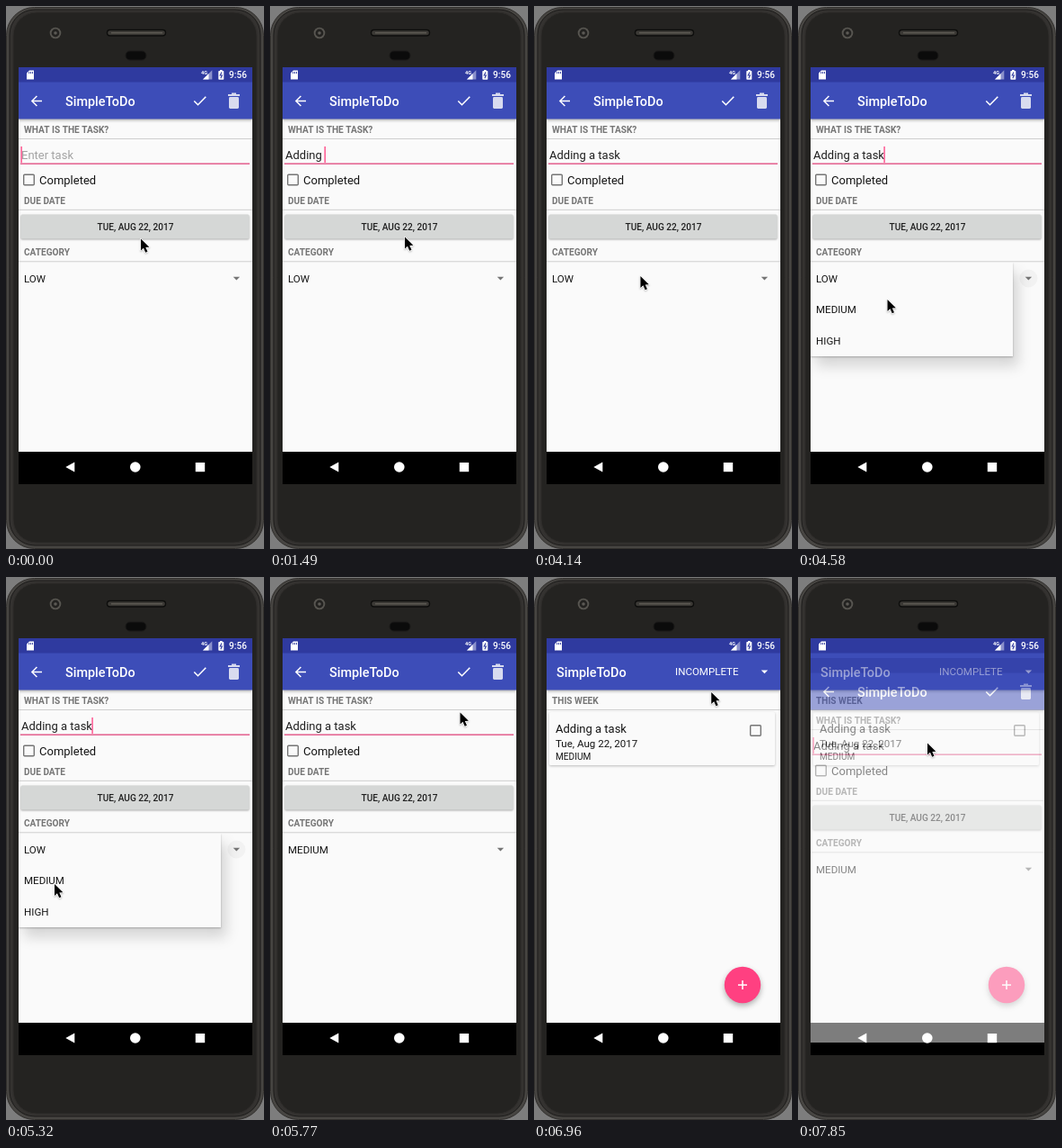
Recreate the animation shown at these times as an HTML page with a canvas. Size 287 by 603 pixels, loop 8 s.

```html
<!DOCTYPE html>
<html lang="en">
<head>
<meta charset="utf-8">
<title>To-do app</title>
<style>
html, body { margin: 0; width: 287px; height: 603px; overflow: hidden; background: #7d7d7d; }
canvas { display: block; }
</style>
</head>
<body>
<canvas id="stage" width="287" height="603"></canvas>
<script>
const W = 287, H = 603, LOOP = 8000, TICK = 148;
const BAR = '#3d4db8', STATUS = '#2f3a9f', PAPER = '#fafafa', INK = '#151515';
const PINK = '#ff4081', GREY = '#757575', RISE = 37;
const TASK = 'Adding a task', DATE = 'Tue, Aug 22, 2017';
const LIST_AT = 6410, EDIT_AT = 7744, MENU_AT = 28, PICK_AT = 36;
const stage = document.getElementById('stage').getContext('2d');
let g = stage;

// Typing bursts, one letter per tick: [first tick, letters]
const bursts = [[4, 'Addi'], [8, 'ng a '], [15, 'tas'], [22, 'k']];

// Pointer moves: [first tick, last tick, x, y]
const moves = [[0, 1, 150, 256.5], [23, 31, 99.5, 326], [31, 34, 54, 341],
  [36, 39, 211.5, 150.5], [39, 41, 215, 109], [46, 50, 144, 184.5]];

const clamp = v => Math.max(0, Math.min(1, v));

function rect(x, y, w, h, color) {
  g.fillStyle = color;
  g.fillRect(x, y, w, h);
}

function round(x, y, w, h, r, fill, line, lw = 1) {
  g.beginPath();
  g.roundRect(x, y, w, h, r);
  if (fill) { g.fillStyle = fill; g.fill(); }
  if (line) { g.strokeStyle = line; g.lineWidth = lw; g.stroke(); }
}

function disc(x, y, r, color) {
  g.beginPath();
  g.arc(x, y, r, 0, 7);
  g.fillStyle = color;
  g.fill();
}

function trace(pts) {
  g.beginPath();
  pts.forEach(p => g.lineTo(...p));
}

function poly(pts, color) {
  trace(pts);
  g.fillStyle = color;
  g.fill();
}

function line(pts, color, lw) {
  trace(pts);
  g.strokeStyle = color;
  g.lineWidth = lw;
  g.stroke();
}

function text(s, x, y, size, color, weight = 400, align = 'left') {
  g.font = `${weight} ${size}px Roboto, sans-serif`;
  g.textAlign = align;
  g.fillStyle = color;
  g.fillText(s, x, y);
}

function shadow(alpha, blur, dx, dy, draw) {
  g.save();
  g.shadowColor = `rgba(0,0,0,${alpha})`;
  g.shadowBlur = blur;
  g.shadowOffsetX = dx;
  g.shadowOffsetY = dy;
  draw();
  g.restore();
}

function clipped(y, h, draw) {
  g.save();
  g.beginPath();
  g.rect(14, y, 260, h);
  g.clip();
  draw();
  g.restore();
}

function phone() {
  rect(0, 0, W, H, '#7d7d7d');
  round(0.5, 1.5, 286, 601, 31, '#474542', '#32302e');
  round(4, 4, 279, 595, 28, '#343230', '#1c1b1a');
  round(8, 7, 271, 589, 26, '#242321', '#2f2d2b');
  disc(55, 30, 6.3, '#575550');
  disc(55, 30, 4.4, '#232220');
  disc(55, 30, 1.8, '#5c5a55');
  round(112.5, 26.5, 65, 6.5, 3.2, '#3b3935', '#0d0d0c', 1.4);
  line([[117, 29.8], [174, 29.8]], '#5b5852', 1.6);
  round(133, 50, 23, 10, 5, '#0b0b0b', '#1a1918');
  rect(14, 68, 260, 463, '#000');
}

function chrome() {
  rect(14, 68, 260, 427, PAPER);
  shadow(0.3, 3, 0, 1, () => rect(14, 84, 260, 41.5, BAR));
  rect(14, 68, 260, 16.5, STATUS);
}

function header(s, y) {
  text(s, 20, y, 10.1, GREY, 700);
  rect(14, y + 6, 260, 1, '#cfcfcf');
}

const arrow = (y, color) => poly([[252.7, y - 1.8], [260.1, y - 1.8], [256.4, y + 1.9]], color);
const checkbox = (x, y) => round(x - 5.8, y - 5.8, 11.6, 11.6, 1, null, GREY, 1.4);

function trash(color) {
  rect(247, 98, 13, 2, color);
  rect(251, 96.5, 5, 2, color);
  round(248, 101, 11, 13, 1.4, color);
}

function editScreen({ task, caret, choice, menu = 0, tap = false }) {
  chrome();
  if (tap) disc(216, 105.5, 13, 'rgba(20,25,80,.14)');
  line([[40, 105.5], [29, 105.5]], '#fff', 1.5);
  line([[34.4, 100], [28.9, 105.5], [34.4, 111]], '#fff', 1.5);
  text('SimpleToDo', 66, 110.5, 14.45, '#fff', 500);
  line([[209.3, 105.5], [213.5, 109.7], [222.3, 100.8]], '#fff', 1.6);
  trash('#d8dbef');

  header('WHAT IS THE TASK?', 141);
  text(task || 'Enter task', 17, 169.7, 13, task ? '#202020' : '#a3a3a3');
  rect(16, 174.5, 255, 1.3, '#e0477d');
  if (caret >= 0) {
    const x = 17 + g.measureText(task.slice(0, caret)).width;
    rect(x - 0.5, 156, 1.3, 18, PINK);
  }
  checkbox(25.5, 193);
  text('Completed', 37, 197.7, 13, INK);
  header('DUE DATE', 219.8);
  shadow(0.3, 2, 0, 1, () => round(16.5, 231.5, 254, 27, 1.5, '#d5d7d6'));
  text(DATE.toUpperCase(), 144, 248.7, 10.1, '#202020', 500, 'center');
  header('CATEGORY', 277.3);
  if (menu) disc(256.4, 302.5, 10, 'rgba(0,0,0,.03)');
  arrow(302.5, GREY);
  text(choice, 20, 306.7, 11.55, INK);
  if (menu) clipped(285, 210, () => dropdown(menu));
}

function dropdown(alpha) {
  const panel = () => rect(14, 285, 225, 104, PAPER);
  g.globalAlpha = alpha;
  shadow(0.15, 14, 6, 11, panel);
  shadow(0.25, 2, 0, 1, panel);
  ['LOW', 'MEDIUM', 'HIGH'].forEach((s, i) => text(s, 20, 306.7 + i * 34.7, 11.55, INK));
}

function listScreen() {
  chrome();
  text('SimpleToDo', 25, 110.5, 14.45, '#fff', 500);
  text('INCOMPLETE', 157, 109.4, 11.55, '#fff');
  arrow(105.3, '#fff');
  header('THIS WEEK', 141);
  shadow(0.25, 3, 0, 1, () => round(17, 150, 251, 59, 1.5, PAPER));
  text(TASK, 24, 173, 13, INK);
  text(DATE, 24, 189, 11.55, INK);
  text('MEDIUM', 24, 203, 10.1, INK);
  checkbox(246.5, 170.5);
  shadow(0.3, 6, 0, 3, () => disc(232, 453, 20.2, PINK));
  rect(227, 452.3, 10, 1.5, '#fff');
  rect(231.25, 448, 1.5, 10, '#fff');
}

function statusIcons() {
  poly([[26, 71.5], [31, 71.5], [31, 81.5], [23, 81.5], [23, 74.5]], '#fff');
  for (let i = 0; i < 3; i++) rect(25.3 + i * 1.9, 73, 0.9, 2.2, STATUS);
  text('4G', 217, 76, 5.6, '#fff', 700);
  poly([[219, 81.5], [229.3, 81.5], [229.3, 71.2]], '#8b91cb');
  poly([[219, 81.5], [225.5, 81.5], [225.5, 75]], '#fff');
  rect(238, 71, 2.6, 1.5, '#fff');
  round(236.3, 72, 6, 9.8, 0.7, '#fff');
  line([[239.9, 73.6], [238.2, 77], [240.4, 77], [238.8, 80.2]], STATUS, 1.1);
  text('9:56', 268, 80.2, 10.1, '#fff', 500, 'right');
}

function navIcons() {
  poly([[66.3, 512], [76.3, 506.5], [76.3, 517.5]], '#fff');
  disc(143.8, 512, 5.8, '#fff');
  rect(210.8, 507, 10.4, 10.2, '#fff');
}

function pointer([x, y]) {
  g.save();
  g.translate(x, y);
  g.scale(0.87, 0.87);
  g.lineJoin = 'round';
  trace([[0, 0], [0, 15], [3.4, 11.9], [6, 17.6], [8.6, 16.4], [6.1, 10.9], [10.8, 10.7]]);
  g.closePath();
  shadow(0.25, 2, 0, 1, () => {
    g.strokeStyle = '#fff';
    g.lineWidth = 1.6;
    g.stroke();
  });
  g.fillStyle = '#000';
  g.fill();
  g.restore();
}

const layer = document.createElement('canvas');
layer.width = W;
layer.height = H;
const layerCtx = layer.getContext('2d');

// A new window fades in while rising to its place
function open(draw, age) {
  g = layerCtx;
  g.clearRect(0, 0, W, H);
  clipped(68, 427, draw);
  g = stage;
  clipped(68, 463, () => {
    g.globalAlpha = clamp(age / 200);
    g.drawImage(layer, 0, Math.round(RISE * (1 - clamp(age / 350)) ** 1.48));
  });
}

function typing(tick) {
  let task = '', last = -2;
  for (const [first, letters] of bursts) {
    const n = Math.min(letters.length, tick - first + 1);
    if (n <= 0) break;
    task += letters.slice(0, n);
    last = first + n - 1;
  }
  const menuOpen = tick > MENU_AT + 2 && tick <= PICK_AT;
  const lit = menuOpen || (tick - last) % 7 < 3;
  return { task, caret: lit ? task.length : -1 };
}

function pointerAt(tick) {
  let x = 150, y = 258.5;
  for (const [a, b, toX, toY] of moves) {
    const k = clamp((tick - a) / (b - a));
    x += (toX - x) * k;
    y += (toY - y) * k;
  }
  return [x, y];
}

function menuAlpha(tick) {
  return Math.min(clamp((tick - MENU_AT) / 2), clamp((PICK_AT + 2 - tick) / 2));
}

function render(ms) {
  const tick = Math.min(53, Math.floor((ms + 8) / TICK));
  const t = tick * TICK;
  phone();
  if (t < EDIT_AT) {
    clipped(68, 427, () => editScreen({
      ...typing(tick), menu: menuAlpha(tick),
      choice: tick < PICK_AT ? 'LOW' : 'MEDIUM', tap: t > LIST_AT
    }));
    if (t > LIST_AT) open(listScreen, t - LIST_AT);
  } else {
    clipped(68, 427, listScreen);
    open(() => editScreen({ task: TASK, caret: 0, choice: 'MEDIUM' }), t - EDIT_AT);
  }
  statusIcons();
  navIcons();
  pointer(pointerAt(tick));
}

const start = performance.now();
function loop() {
  render((performance.now() - start) % LOOP);
  requestAnimationFrame(loop);
}
loop();
</script>
</body>
</html>
```
